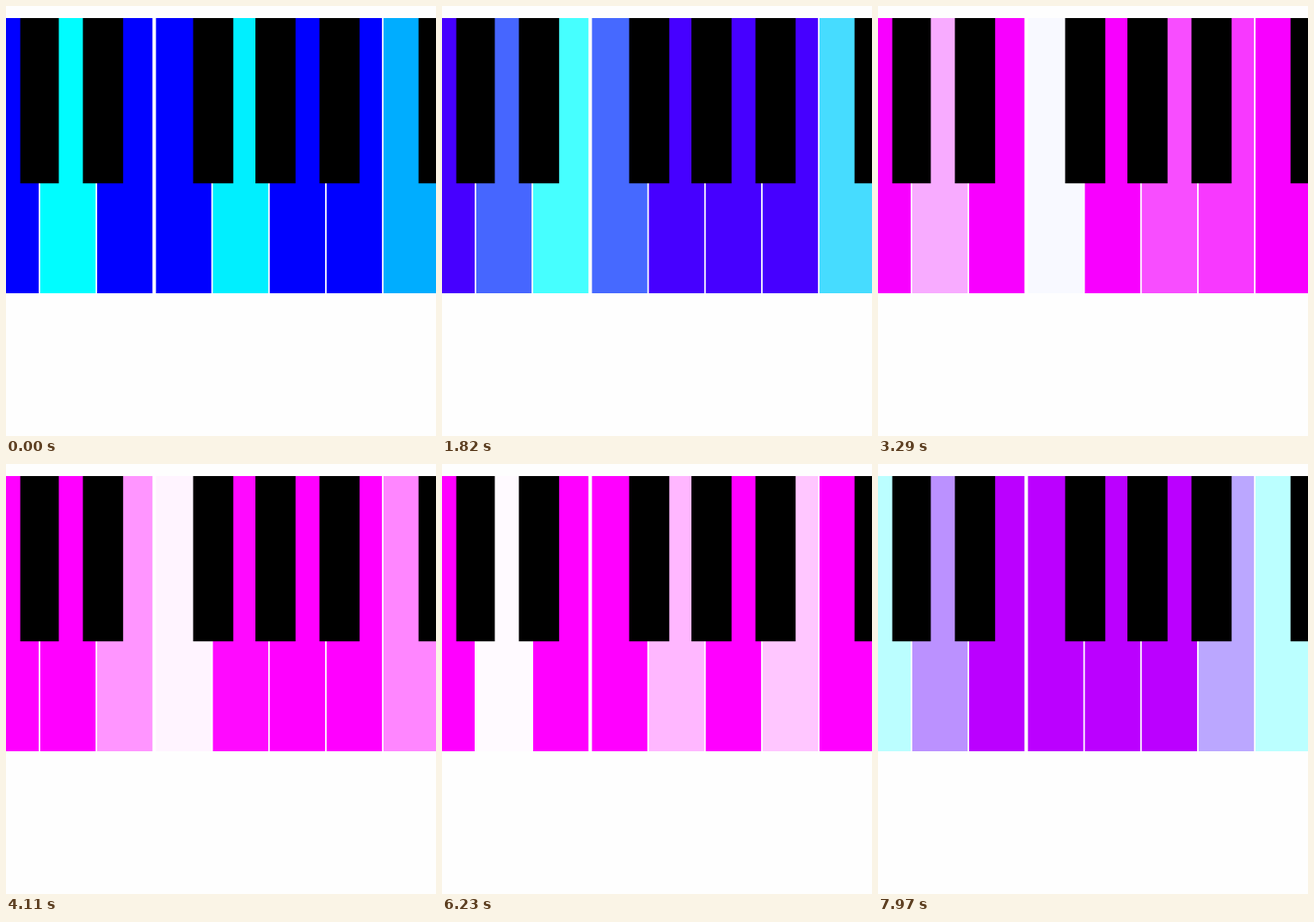
An HTML page for the animation above (8 s loop, 500 by 500 pixels).

```html
<!DOCTYPE html>
<html lang="en">
<head>
<meta charset="utf-8">
<title>Colour piano</title>
<style>
html, body { margin: 0; width: 100%; height: 100%; overflow: hidden; background: #fefefe; }
svg { display: block; width: 100%; height: 100%; }
</style>
</head>
<body>
<svg viewBox="0 0 500 500">
  <defs>
    <clipPath id="below"><rect y="14" width="500" height="486"/></clipPath>
    <filter id="soft" filterUnits="userSpaceOnUse" x="-20" y="-20" width="540" height="400"
      color-interpolation-filters="sRGB">
      <feGaussianBlur stdDeviation="0.45 0.7"/>
    </filter>
  </defs>
  <g clip-path="url(#below)"><g id="piano" filter="url(#soft)"></g></g>
</svg>
<script>
const LOOP = 8000, TICK = 1000 / 15;
const PITCH = 66.15, LINE = 1.8;
const BLACK_KEYS = [[16.6, 61.4], [89.4, 136.2], [217.6, 264.3], [290, 336.7],
  [364.5, 411.2], [479.7, 510]];

const piano = document.getElementById('piano');
const sin = deg => Math.sin(deg * Math.PI / 180);
const level = v => Math.round(Math.max(0, Math.min(255, v)));

function addKey(left, right, bottom) {
  const rect = document.createElementNS('http://www.w3.org/2000/svg', 'rect');
  const box = { x: left, y: -10, width: right - left, height: bottom + 10 };
  for (const name in box) rect.setAttribute(name, box[name]);
  piano.appendChild(rect);
  return rect;
}

// A wider gap parts the two octaves after the third key.
const whiteKeys = Array.from({ length: 8 }, (_, i) => {
  const left = (i < 3 ? 171.2 : 173.5) + PITCH * (i - 3);
  return addKey(left + LINE / 2, left + PITCH - LINE / 2, 334);
});
BLACK_KEYS.forEach(([left, right]) => addKey(left, right, 206.2));

// Each key swings at a speed set by its distance from the middle.
function draw(t) {
  const time = Math.floor((t + 5) / TICK) * TICK + 21;
  const red = level(128 + 245 * sin(0.0293 * (time - 2290)));
  whiteKeys.forEach((key, i) => {
    const green = level(255 * sin(0.0983 * (time - 1150) * (3.37 - i)));
    key.setAttribute('fill', `rgb(${red},${green},255)`);
  });
}

const start = performance.now();
function frame() {
  draw((performance.now() - start) % LOOP);
  requestAnimationFrame(frame);
}
frame();
</script>
</body>
</html>
```
